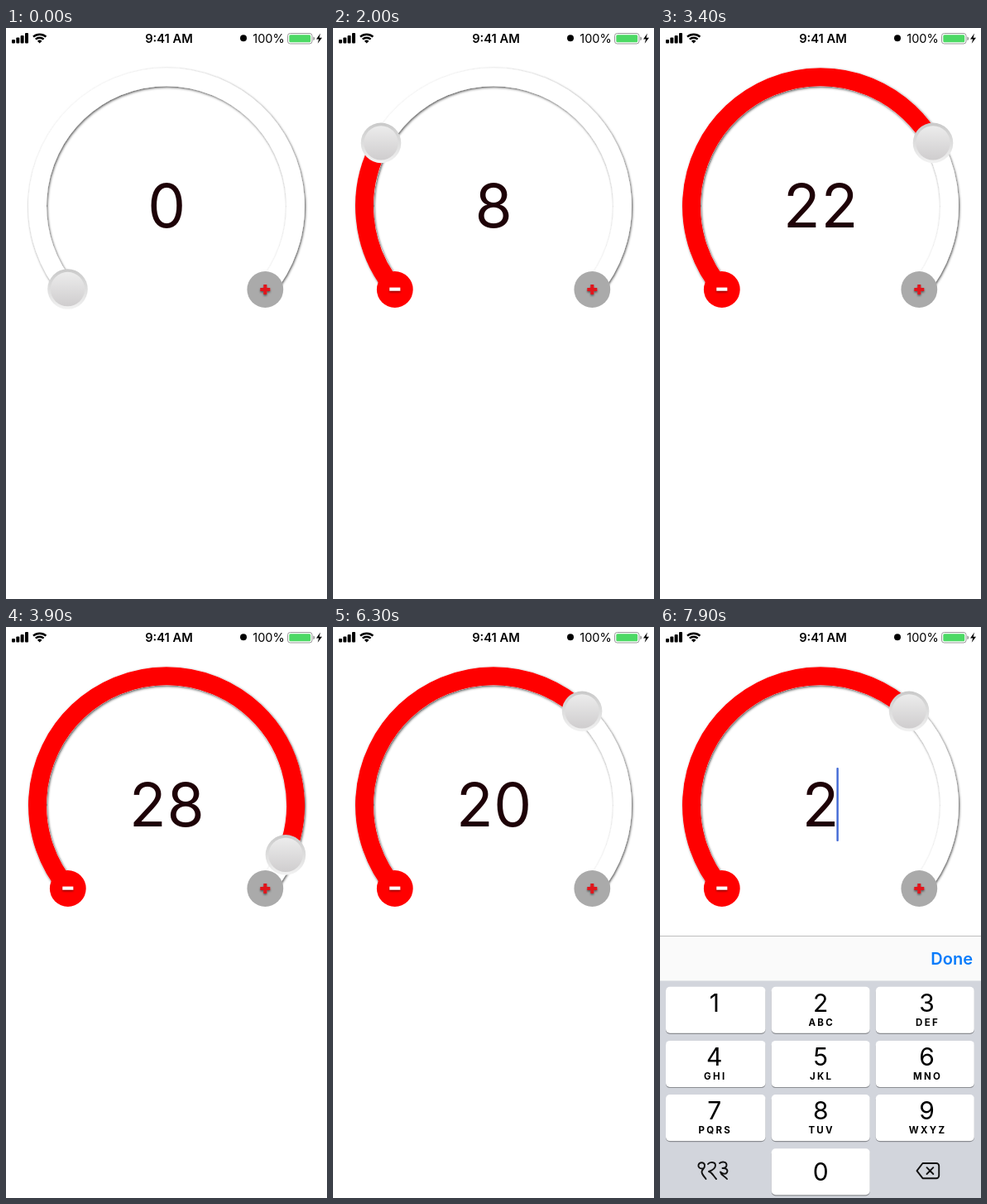
These frames come from a looping animation (388x690 px, 8000 ms). An HTML page:

```html
<!DOCTYPE html>
<html lang="en">
<head>
<meta charset="utf-8">
<title>Round slider</title>
<style>
html, body { margin: 0; width: 100%; height: 100%; overflow: hidden; background: #fff; }
svg { display: block; font-family: Inter, "Liberation Sans", sans-serif; }
text { text-anchor: middle; }
.arc { fill: none; stroke-width: 22; }
.line { fill: none; stroke: #111; stroke-width: 1.9; stroke-linecap: round; stroke-linejoin: round; }
.digit { font-size: 30px; }
.letters { font-size: 11.5px; font-weight: 700; letter-spacing: 2.3px; }
#label { font-size: 73px; letter-spacing: -1.5px; font-variant-numeric: tabular-nums; }
</style>
</head>
<body>
<svg width="388" height="690" viewBox="0 0 388 690">
  <defs>
    <filter id="ringShadow"><feDropShadow dx="1" dy="1.3" stdDeviation="1.7" flood-opacity=".7"/></filter>
    <filter id="signShadow" x="-50%" y="-50%" width="200%" height="250%"><feDropShadow dx="0" dy="1.5" stdDeviation="1.2" flood-opacity=".5"/></filter>
    <linearGradient id="rim" x2="0" y2="1"><stop stop-color="#c9c9c9"/><stop offset="1" stop-color="#f2f2f2"/></linearGradient>
    <linearGradient id="face" x2="0" y2="1"><stop stop-color="#ececec"/><stop offset="1" stop-color="#cfcdce"/></linearGradient>
  </defs>

  <!-- status bar -->
  <g>
    <rect x="7" y="14" width="4" height="4.5" rx="1"/>
    <rect x="12.3" y="11.5" width="4" height="7" rx="1"/>
    <rect x="17.6" y="9" width="4" height="9.5" rx="1"/>
    <rect x="23" y="6" width="4" height="12.5" rx="1"/>
    <g fill="none" stroke="#000" stroke-width="2.4">
      <path d="M33 10.7a11.4 11.4 0 0 1 15.4 0M35.8 13.6a7.2 7.2 0 0 1 9.8 0"/>
    </g>
    <path d="M40.7 18.6l-2.8-2.9a4.2 4.2 0 0 1 5.6 0z"/>
    <text x="197" y="17.6" font-size="14.7" font-weight="600">9:41 AM</text>
    <circle cx="287" cy="12.3" r="4"/>
    <text x="317.5" y="17.6" font-size="14.5">100%</text>
    <rect x="340.5" y="6.5" width="29.5" height="12.5" rx="3" fill="#fff" stroke="#999"/>
    <rect x="342.3" y="8.3" width="25.9" height="8.9" rx="1.5" fill="#4cd964"/>
    <path d="M371.3 10.5q2 .5 2 2.3t-2 2.3z" fill="#999"/>
    <path d="M380 6.5l-5 7h3.2l-1.5 5.2 5.3-7h-3.4z"/>
  </g>

  <!-- slider -->
  <path class="arc" d="M74.5 315.6A156 156 0 1 1 313.5 315.6" stroke="#fff" filter="url(#ringShadow)"/>
  <path class="arc" id="fill" d="M74.5 315.6A156 156 0 1 1 313.5 315.6" stroke="#f00" pathLength="30"/>
  <circle cx="74.8" cy="316" r="21.9" fill="#f00"/>
  <rect x="68.3" y="313.6" width="13" height="4" fill="#fff" filter="url(#signShadow)"/>
  <circle cx="313.3" cy="316" r="21.9" fill="#aaa"/>
  <path d="M313.3 310v12M307.3 316h12" stroke="#e0161e" stroke-width="4" filter="url(#signShadow)"/>
  <g id="knob">
    <circle r="24.3" fill="url(#rim)"/>
    <circle r="20.7" fill="url(#face)"/>
  </g>
  <text id="label" x="193.5" y="241" fill="#1e0207"></text>
  <rect id="caret" y="170" width="2.4" height="89" rx="1" fill="#4169d6"/>

  <!-- number pad, drawn in its final place -->
  <g id="pad">
    <rect y="373" width="388" height="55" fill="#fafafa"/>
    <rect y="373" width="388" height="1" fill="#bfbfbf"/>
    <rect y="427.5" width="388" height="270" fill="#d2d5dc"/>
    <text x="378" y="408" font-size="20" font-weight="600" fill="#087bfb" style="text-anchor:end">Done</text>
    <g id="keys"></g>
    <g class="line" aria-label="१२३">
      <path d="M52 654.5C48 655 45.800 652.500 46.500 650C47.500 646.500 53 646 54 650C54.800 653.500 51 655.500 50.500 658C50.200 661 53 663.500 55.500 667"/>
      <path d="M58 649C60 646 67 646 67 650.500C67 655 62 657 59 658C63 659 65 664 68 667"/>
      <path d="M72 648C75 645.500 80.500 646 80.500 650C80.500 653 78 654 75.500 654C80 653.500 82.500 656 81 659C79.500 662 75 660.500 73 658.500C74 663 78 663 81 667"/>
    </g>
    <path class="line" d="M317.500 648H334a3.200 3.200 0 0 1 3.200 3.200V663a3.200 3.200 0 0 1-3.200 3.200H317.500L310.500 657.100zM322.500 653.200l7.800 7.800M330.300 653.200l-7.800 7.800"/>
  </g>
</svg>
<script>
const $ = id => document.getElementById(id);
const LOOP = 8000, STEP = 100;
const PAD_START = 6600, PAD_HEIGHT = 317, DELETE_AT = 7500;

// time in ms, slider value
const drag = [[1500, 2], [2300, 12.3], [2600, 15], [2800, 16], [2950, 16],
              [3900, 28], [4200, 30], [5100, 30], [6100, 20]];

const letters = ["", "ABC", "DEF", "GHI", "JKL", "MNO", "PQRS", "TUV", "WXYZ"];

function key(col, row, digit, sub) {
  const x = [7, 134.7, 260.8][col], y = 434.7 + row * 65.2, w = col ? 119 : 120.5;
  const mid = 194.2 + (col - 1) * 128.4;
  return `<rect x="${x}" y="${y + 1.2}" width="${w}" height="56" rx="5" fill="#8b8d92"/>
    <rect x="${x}" y="${y}" width="${w}" height="56" rx="5" fill="#fff"/>
    <text class="digit" x="${mid}" y="${y + (sub === null ? 38.3 : 30.3)}">${digit}</text>
    <text class="letters" x="${mid + 1}" y="${y + 47.3}">${sub || ""}</text>`;
}
$("keys").innerHTML = letters.map((s, i) => key(i % 3, Math.floor(i / 3), i + 1, s)).join("") + key(1, 3, 0, null);

function valueAt(t) {
  if (t < drag[0][0]) return 0;
  const i = drag.findIndex(k => k[0] > t);
  if (i < 0) return drag.at(-1)[1];
  const [t0, v0] = drag[i - 1], [t1, v1] = drag[i];
  return Math.round(v0 + (v1 - v0) * (t - t0) / (t1 - t0));
}

// critically damped spring: share of the way still to go
function springLeft(ms) {
  const s = Math.max(0, ms) * 0.01826;
  return (1 + s) * Math.exp(-s);
}

function draw(now) {
  const t = Math.floor(now % LOOP / STEP) * STEP;
  const v = valueAt(t), a = (140 + v * 260 / 30) * Math.PI / 180;
  const deleted = t >= DELETE_AT;
  $("fill").setAttribute("stroke-dasharray", `${v} 60`);
  $("knob").setAttribute("transform", `translate(${194 + 156 * Math.cos(a)} ${215.3 + 156 * Math.sin(a)})`);
  $("label").textContent = deleted ? 2 : v;
  $("caret").setAttribute("x", deleted ? 213.4 : 235.8);
  $("caret").setAttribute("visibility", t >= PAD_START ? "visible" : "hidden");
  $("pad").setAttribute("transform", `translate(0 ${PAD_HEIGHT * springLeft(t - PAD_START)})`);
  requestAnimationFrame(draw);
}
requestAnimationFrame(draw);
</script>
</body>
</html>
```
